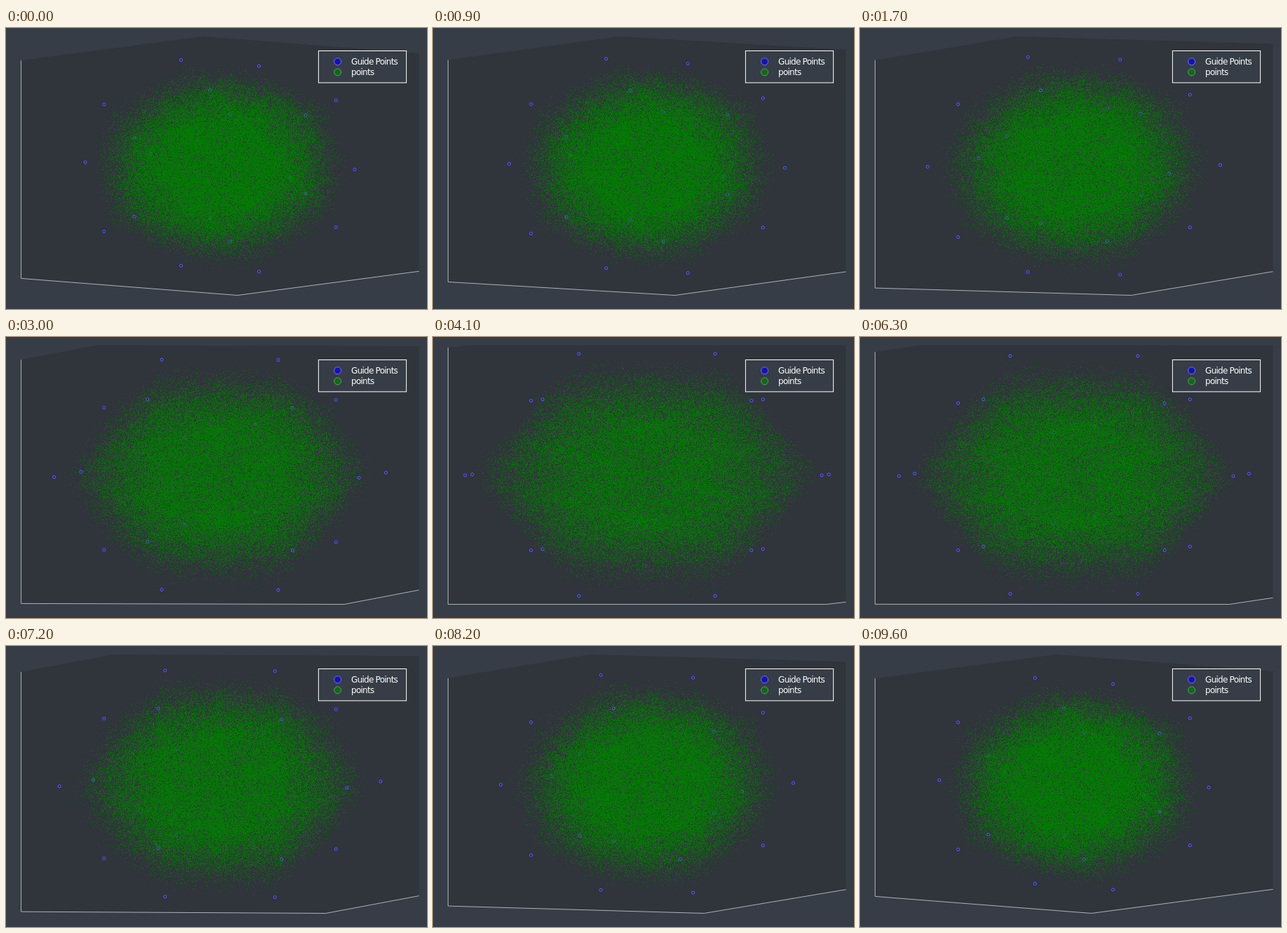
These frames come from a looping animation (600 px wide and 400 px high, 10000 ms). An HTML page with a canvas:

```html
<!DOCTYPE html>
<html lang="en">
<head>
<meta charset="utf-8">
<title>Rotating point cloud</title>
<style>
  html, body { margin: 0; width: 100%; height: 100%; overflow: hidden; background: #363d46; }
  canvas, svg { position: absolute; left: 0; top: 0; width: 600px; height: 400px; }
  text { font: 12px "DejaVu Sans", Verdana, sans-serif; letter-spacing: -0.76px; fill: #fff; }
</style>
</head>
<body>
<canvas id="plot" width="600" height="400"></canvas>
<svg viewBox="0 0 600 400">
  <rect x="445.4" y="32.5" width="125.2" height="45.4" fill="#363d46" stroke="#fff"/>
  <circle cx="472.6" cy="47.8" r="5" fill="#1212be" stroke="#7a78d0"/>
  <circle cx="472.6" cy="62.9" r="5" fill="#12681a" stroke="#58a05c"/>
  <text x="492.1" y="52">Guide Points</text>
  <text x="492.1" y="67">points</text>
</svg>
<script>
const W = 600, H = 400;
const CX = 305, CY = 196.25, SPAN_X = 567, SPAN_Y = 368.5;
const FRAMES = 100, STEP = 100, COUNT = 100000, COVER = 0.62;
const PHI = (1 + Math.sqrt(5)) / 2;
const LIMIT = PHI * 1.06;

const ctx = document.getElementById('plot').getContext('2d');
const layer = document.createElement('canvas');
layer.width = W;
layer.height = H;
const layerCtx = layer.getContext('2d');
const image = layerCtx.createImageData(W, H);

let seed = 20231;
function random() {
  seed = (seed + 0x6d2b79f5) | 0;
  let t = Math.imul(seed ^ (seed >>> 15), 1 | seed);
  t = (t + Math.imul(t ^ (t >>> 7), 61 | t)) ^ t;
  return ((t ^ (t >>> 14)) >>> 0) / 4294967296;
}

// Dodecahedron corners, scaled so the plot box spans -0.5 to 0.5
function dodecahedron() {
  const list = [], signs = [-1, 1];
  for (const a of signs) for (const b of signs) {
    const p = a * PHI, q = b / PHI;
    list.push([p, q, 0], [q, 0, p], [0, p, q], [a, b, 1], [a, b, -1]);
  }
  return list.map(v => v.map(n => n / (2 * LIMIT)));
}

// Chaos game: jump halfway to a random corner each time
function chaos(corners) {
  const out = new Float32Array(COUNT * 3);
  let x = 0, y = 0, z = 0;
  for (let i = -20; i < COUNT; i++) {
    const c = corners[Math.floor(random() * corners.length)];
    x = (x + c[0]) / 2;
    y = (y + c[1]) / 2;
    z = (z + c[2]) / 2;
    if (i >= 0) out.set([x, y, z], i * 3);
  }
  return out;
}

const guides = dodecahedron();
const cloud = chaos(guides);

// Screen vectors of the three box edges for whole-degree angles
function axes(azimuth, elevation) {
  const r = azimuth * Math.PI / 180, t = elevation * Math.PI / 180;
  const c = Math.cos(r), s = Math.sin(r);
  const lift = Math.tan(t / 2), up = Math.cos(t);
  const kx = SPAN_X / (c + s), ky = SPAN_Y / (lift + up);
  return { xx: kx * c, yx: kx * s, xy: ky * lift * s * s, yy: -ky * lift * c * c, zy: -ky * up };
}

function project(m, x, y, z) {
  return [CX + m.xx * x + m.yx * y, CY + m.xy * x + m.yy * y + m.zy * z];
}

function trace(points) {
  ctx.beginPath();
  for (const p of points) ctx.lineTo(p[0], p[1]);
}

function drawBox(m) {
  const h = 0.5, at = (x, y, z) => project(m, x, y, z);
  const topLeft = at(-h, -h, h), left = at(-h, -h, -h), front = at(h, -h, -h), right = at(h, h, -h);
  trace([topLeft, left, front, right, at(h, h, h), at(-h, h, h)]);
  ctx.fillStyle = '#30343b';
  ctx.fill();
  trace([topLeft, left, front, right]);
  ctx.strokeStyle = '#adb2b7';
  ctx.lineWidth = 1;
  ctx.stroke();
}

function drawGuides(m) {
  ctx.fillStyle = '#1c1c9c';
  ctx.strokeStyle = '#6c62ee';
  for (const g of guides) {
    const [x, y] = project(m, ...g);
    ctx.beginPath();
    ctx.arc(x, y, 2, 0, 2 * Math.PI);
    ctx.fill();
    ctx.stroke();
  }
}

function drawCloud(m) {
  const d = image.data;
  d.fill(0);
  for (let i = 0; i < cloud.length; i += 3) {
    const x = cloud[i], y = cloud[i + 1], z = cloud[i + 2];
    const px = Math.floor(CX + m.xx * x + m.yx * y);
    const py = Math.floor(CY + m.xy * x + m.yy * y + m.zy * z);
    const k = (py * W + px) * 4;
    d[k + 1] = 128;
    d[k + 3] += (255 - d[k + 3]) * COVER;
  }
  layerCtx.putImageData(image, 0, 0);
  ctx.drawImage(layer, 0, 0);
}

let shown = '';
function render(now) {
  const i = Math.floor(now / STEP) % FRAMES;
  const swing = 1 + Math.cos(2 * Math.PI * i / (FRAMES - 1));
  const azimuth = Math.round(20 * swing), elevation = Math.round(10 * swing);
  const pose = azimuth + ',' + elevation;
  if (pose === shown) return;
  shown = pose;
  const m = axes(azimuth, elevation);
  ctx.fillStyle = '#363d46';
  ctx.fillRect(0, 0, W, H);
  drawBox(m);
  drawGuides(m);
  drawCloud(m);
}

const start = performance.now();
function tick() {
  render(performance.now() - start);
  requestAnimationFrame(tick);
}
tick();
</script>
</body>
</html>
```
